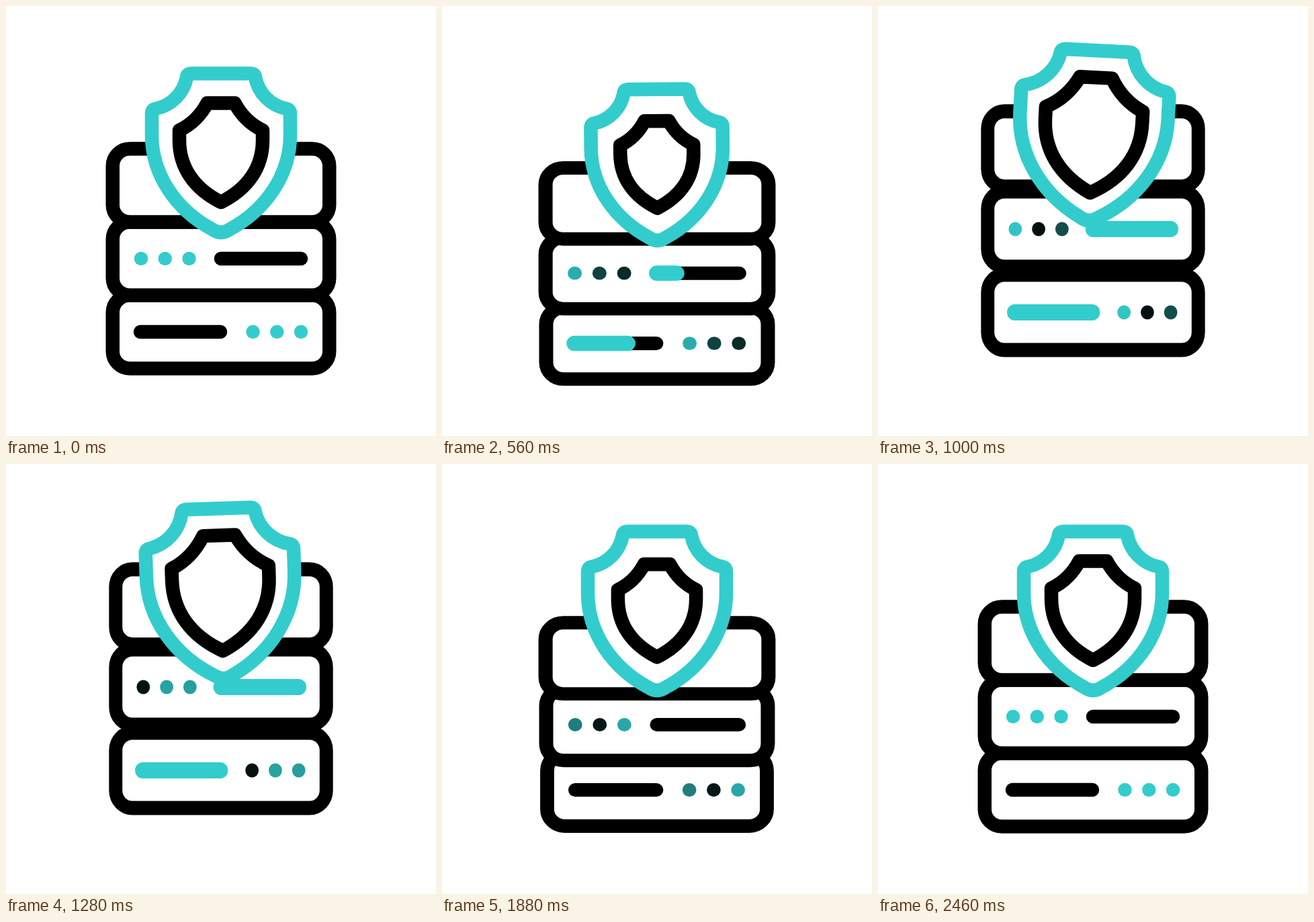
Write an HTML page with a canvas that moves like this. It is 640 px wide and 640 px high and loops after 2.8 s.

```html
<!DOCTYPE html>
<html lang="en">
<head>
<meta charset="utf-8">
<title>Protected server</title>
<style>
  html, body { margin: 0; width: 100%; height: 100%; overflow: hidden; background: #fff; }
  canvas { display: block; width: 640px; height: 640px; }
</style>
</head>
<body>
<canvas id="stage"></canvas>
<script>
const LOOP = 2800, LINE = 20.5, CYAN = '#33cccc';
const canvas = document.getElementById('stage');
const ctx = canvas.getContext('2d');
const ratio = window.devicePixelRatio || 1;
canvas.width = canvas.height = 640 * ratio;

const smooth = p => (1 - Math.cos(Math.PI * p)) / 2;

// Eased value at time t from [time, value] pairs
function track(t, keys) {
  if (t <= keys[0][0]) return keys[0][1];
  for (let i = 1; i < keys.length; i++) {
    const [t0, a] = keys[i - 1], [t1, b] = keys[i];
    if (t < t1) return a + (b - a) * smooth((t - t0) / (t1 - t0));
  }
  return keys[keys.length - 1][1];
}

// Times at which each light is alternately fully lit and dark
const blinks = [
  [220, 430, 585, 745, 1010, 1255, 1555, 1745, 1965, 2165, 2360],
  [290, 475, 740, 980, 1240, 1440, 1635, 1910, 2150],
  [380, 606, 850, 1094, 1337, 1582, 1838, 2068, 2311]
];

function glow(t, times) {
  const i = times.findIndex(x => t < x);
  if (i < 1) return 1;
  const p = (t - times[i - 1]) / (times[i] - times[i - 1]);
  return i % 2 ? 1 - p : p;
}

// n counts the units from the bottom; upper ones move later and rise higher
const units = [
  { n: 0, y: 485, rise: -29, bar: -120, dots: 47.5 },
  { n: 1, y: 376, rise: -44, bar: 0, dots: -119 },
  { n: 2, y: 267, rise: -54.3 }
];

const lift = (t, n, rise) => track(t, [
  [200 + 60 * n, 0], [420 + 60 * n, 27.5], [920, rise], [1422 + 50 * n, rise],
  [1685 + 60 * n, 27.5], [2015 + 60 * n, -15], [2365 + 40 * n, 0]
]);

const squash = (t, n) => track(t, [
  [300 + 60 * n, 0], [460 + 60 * n, 0.03], [920, -0.028], [1500 + 60 * n, -0.028],
  [1745 + 50 * n, 0.03], [2075 + 50 * n, -0.014], [2380 + 40 * n, 0]
]);

function line(x0, x1, width, color) {
  ctx.beginPath();
  ctx.moveTo(x0, 0);
  ctx.lineTo(x1, 0);
  ctx.lineWidth = width;
  ctx.strokeStyle = color;
  ctx.stroke();
}

function drawBar(t, n, x) {
  const from = track(t, [[1431 + 67 * n, 0], [1631 + 64 * n, 1]]);
  const to = track(t, [[430 + 60 * n, 0], [650 + 60 * n, 1]]);
  line(x, x + 119, LINE, '#000');
  if (to > 0 && from < 1) line(x + 119 * from, x + 119 * to, 23.3, CYAN);
}

function drawLights(t, x) {
  blinks.forEach((times, i) => {
    const b = glow(t, times);
    ctx.fillStyle = `rgb(${51 * b}, ${204 * b}, ${204 * b})`;
    ctx.beginPath();
    ctx.arc(x + 35.75 * i, 0, 10.2, 0, 2 * Math.PI);
    ctx.fill();
  });
}

function drawUnit(t, { n, y, rise, bar, dots }) {
  const s = squash(t, n);
  ctx.save();
  ctx.translate(320, y + lift(t, n, rise));
  ctx.scale(1 + s, 1 - s);
  ctx.beginPath();
  ctx.roundRect(-161.25, -54.5, 322.5, 109, 25.5);
  ctx.fillStyle = '#fff';
  ctx.fill();
  ctx.lineWidth = LINE;
  ctx.strokeStyle = '#000';
  ctx.stroke();
  if (dots !== undefined) {
    drawBar(t, n, bar);
    drawLights(t, dots);
  }
  ctx.restore();
}

const outer = new Path2D(`M276 100.5H364Q370.5 100.5 371 106A59 59 0 0 0 417.5 153
  Q423 154 423 160V192C423 250 388 303 332 333Q320 341 308 333
  C252 303 217 250 217 192V160Q217 154 222.5 153A59 59 0 0 0 269 106Q269.5 100.5 276 100.5Z`);
const inner = new Path2D(`M299.5 144.5H340.5Q355 172 382 185V200C382 240 360 272 320 292
  C280 272 258 240 258 200V185Q285 172 299.5 144.5Z`);

// Scales the outline around the shield's centre but keeps the line weight
function outline(path, scale, color) {
  ctx.save();
  ctx.scale(scale, scale);
  ctx.translate(-320, -218.6);
  ctx.fillStyle = '#fff';
  ctx.fill(path);
  ctx.lineWidth = LINE / scale;
  ctx.strokeStyle = color;
  ctx.stroke(path);
  ctx.restore();
}

function drawShield(t) {
  const dy = lift(t, 0, -26);
  const tilt = track(t, [[500, 0], [745, -3.2], [1010, 3], [1260, -2], [1420, 0]]);
  const core = track(t, [
    [225, 1], [460, 0.85], [969, 1.165], [1482, 1.165], [1742, 0.85], [2072, 1.08], [2420, 1]
  ]);
  ctx.save();
  ctx.translate(320, 218.6 + dy);
  ctx.rotate(tilt * Math.PI / 180);
  outline(outer, 1 - 0.0027 * dy, CYAN);
  outline(inner, core, '#000');
  ctx.restore();
}

function draw(t) {
  ctx.setTransform(ratio, 0, 0, ratio, 0, 0);
  ctx.fillStyle = '#fff';
  ctx.fillRect(0, 0, 640, 640);
  ctx.lineCap = ctx.lineJoin = 'round';
  units.forEach(unit => drawUnit(t, unit));
  drawShield(t);
}

const start = performance.now();
function run() {
  draw(Math.max(0, performance.now() - start) % LOOP);
  requestAnimationFrame(run);
}
run();
</script>
</body>
</html>
```
